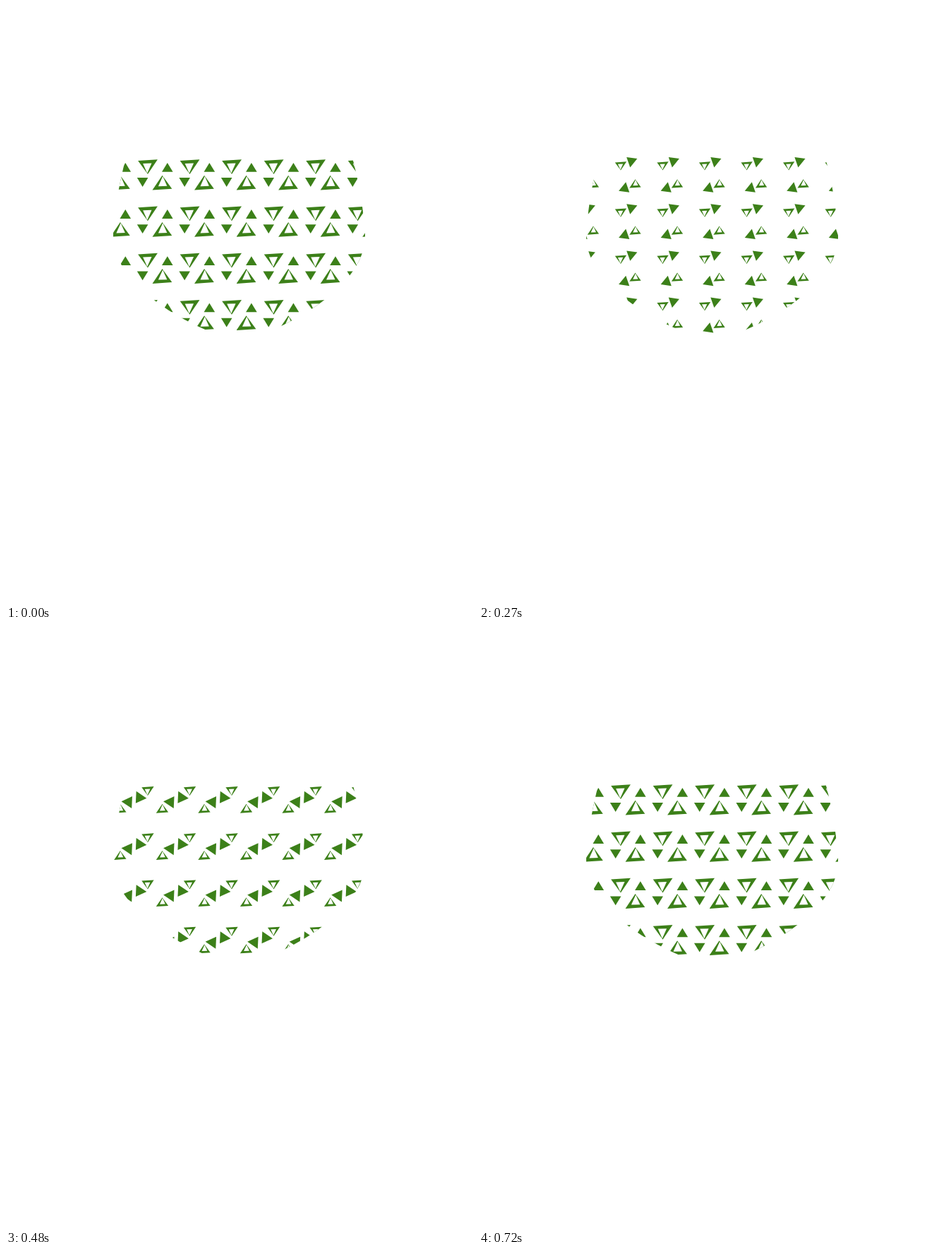
Write an HTML page with a canvas that moves like this. It is 662x845 px and loops after 0.75 s.

```html
<!DOCTYPE html>
<html lang="en">
<head>
<meta charset="utf-8">
<title>Triangle pattern</title>
<style>
  html, body { margin: 0; width: 100%; height: 100%; overflow: hidden; background: #fff; }
  canvas { display: block; }
</style>
</head>
<body>
<canvas id="stage" width="662" height="845"></canvas>
<script>
const ctx = document.getElementById('stage').getContext('2d');
const GREEN = '#3c8019', WHITE = '#fff';
const STEP = 30, STEPS = 25;
const DX = 59.55, DY = 66.2, X0 = 211.2, Y0 = 238.9;

// Triangles relative to the middle of a tile
const SOLID = new Path2D('M17.6-17 25.4-4.2 9.8-4.2Z');
const OUTER = new Path2D('M-13.8-5.6 14-7.4 0 13.4Z');
const INNER = new Path2D('M-6.8-1.7 5.6-2.1-.7 12Z');
const BOWL = new Path2D(`M174.5 199.5H486.5Q504.5 258 509 322
  C512.5 392 410.5 452 330.5 476 C250.5 452 148.5 392 152 322 Q156.5 258 174.5 199.5Z`);

const mix = (a, b, p) => a + (b - a) * p;

const turnAt = t => Math.PI * (t < .5 ? 2 * t * t : 1 - .5 * Math.pow(2 - 2 * t, 2.4));

// Solids swell quickly before the middle, then settle back slowly
function growAt(t) {
  if (t < .36) return 1;
  return t < .5 ? mix(1, 1.2, (t - .36) / .14) : mix(1.2, 1, 2 * t - 1);
}

const shrinkAt = t => 1 - .46 * Math.pow(Math.abs(Math.sin(Math.PI * t)), 1.4);

function fill(path, color) {
  ctx.fillStyle = color;
  ctx.fill(path);
}

function halfTile(turn, grow, shrink) {
  ctx.save();
  ctx.rotate(-turn);
  ctx.scale(grow, grow);
  fill(SOLID, GREEN);
  ctx.restore();

  ctx.save();
  ctx.translate(-10.3, -14.2);
  ctx.scale(shrink, shrink);
  fill(OUTER, GREEN);
  fill(INNER, WHITE);
  ctx.restore();
}

function draw(t) {
  const pose = [turnAt(t), growAt(t), shrinkAt(t)];
  ctx.fillStyle = WHITE;
  ctx.fillRect(0, 0, 662, 845);
  ctx.save();
  ctx.clip(BOWL);
  for (let row = -1; row < 5; row++) {
    for (let col = -1; col < 6; col++) {
      ctx.save();
      ctx.translate(X0 + col * DX, Y0 + row * DY);
      halfTile(...pose);
      ctx.rotate(Math.PI);
      halfTile(...pose);
      ctx.restore();
    }
  }
  ctx.restore();
}

function tick() {
  const step = Math.floor(performance.now() / STEP) % STEPS;
  draw(step / (STEPS - 1));
  requestAnimationFrame(tick);
}
tick();
</script>
</body>
</html>
```
